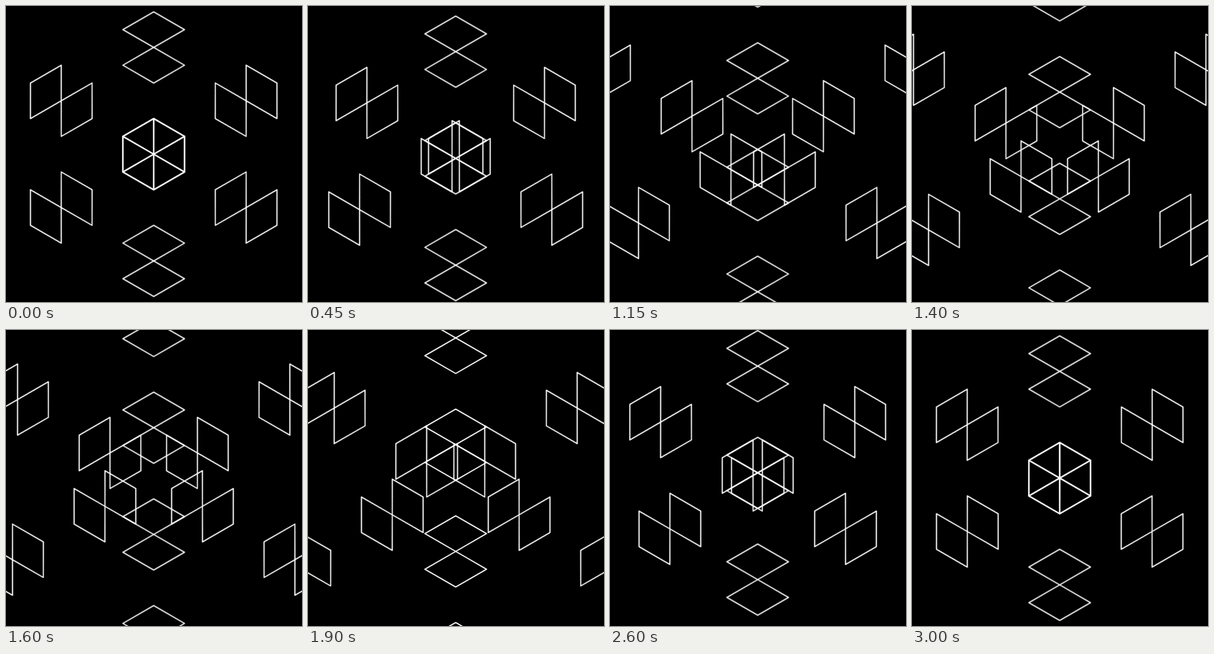
An HTML page for the animation above (3050 ms loop, 500 px wide and 500 px high).

```html
<!DOCTYPE html>
<html lang="en">
<head>
<meta charset="utf-8">
<title>Sliding rhombi</title>
<style>
  html, body { margin: 0; width: 100%; height: 100%; overflow: hidden; background: #000; }
  svg { display: block; width: 500px; height: 500px; }
  path { fill: none; stroke: #fff; stroke-width: 2; stroke-linejoin: round; }
</style>
</head>
<body>
<svg viewBox="0 0 500 500">
  <g id="scene" transform="translate(249.5 250.3)"></g>
</svg>
<script>
  const NS = 'http://www.w3.org/2000/svg';
  const EDGE = 60.1;
  const GAP = 3 * EDGE;
  const FRAMES = 61;
  const scene = document.getElementById('scene');

  // Two rhombi touching at a corner
  const w = EDGE * Math.sqrt(3) / 2, h = EDGE / 2;
  const pair = `l${w} ${-h} ${-w} ${-h} ${-w} ${h}z l${w} ${h} ${-w} ${h} ${-w} ${-h}z`;
  const column = [-3, -2, -1, 0, 1, 2].map(n => `M0 ${n * GAP}${pair}`).join('');

  function make(tag, attrs, parent) {
    const el = document.createElementNS(NS, tag);
    for (const name in attrs) el.setAttribute(name, attrs[name]);
    return parent.appendChild(el);
  }

  const rest = 'translateY(0px)';
  const slide = [
    { transform: rest, offset: 0 },
    { transform: rest, offset: 1 / FRAMES, easing: 'cubic-bezier(.39, 0, .61, 1)' },
    { transform: `translateY(${GAP}px)`, offset: 1 }
  ];

  // Each column slides one gap along its own axis, in 50 ms steps
  for (const angle of [0, -60, 60]) {
    const axis = make('g', { transform: `rotate(${angle})` }, scene);
    make('path', { d: column }, axis).animate(slide, {
      duration: FRAMES * 50,
      easing: `steps(${FRAMES})`,
      iterations: Infinity
    });
  }
</script>
</body>
</html>
```
